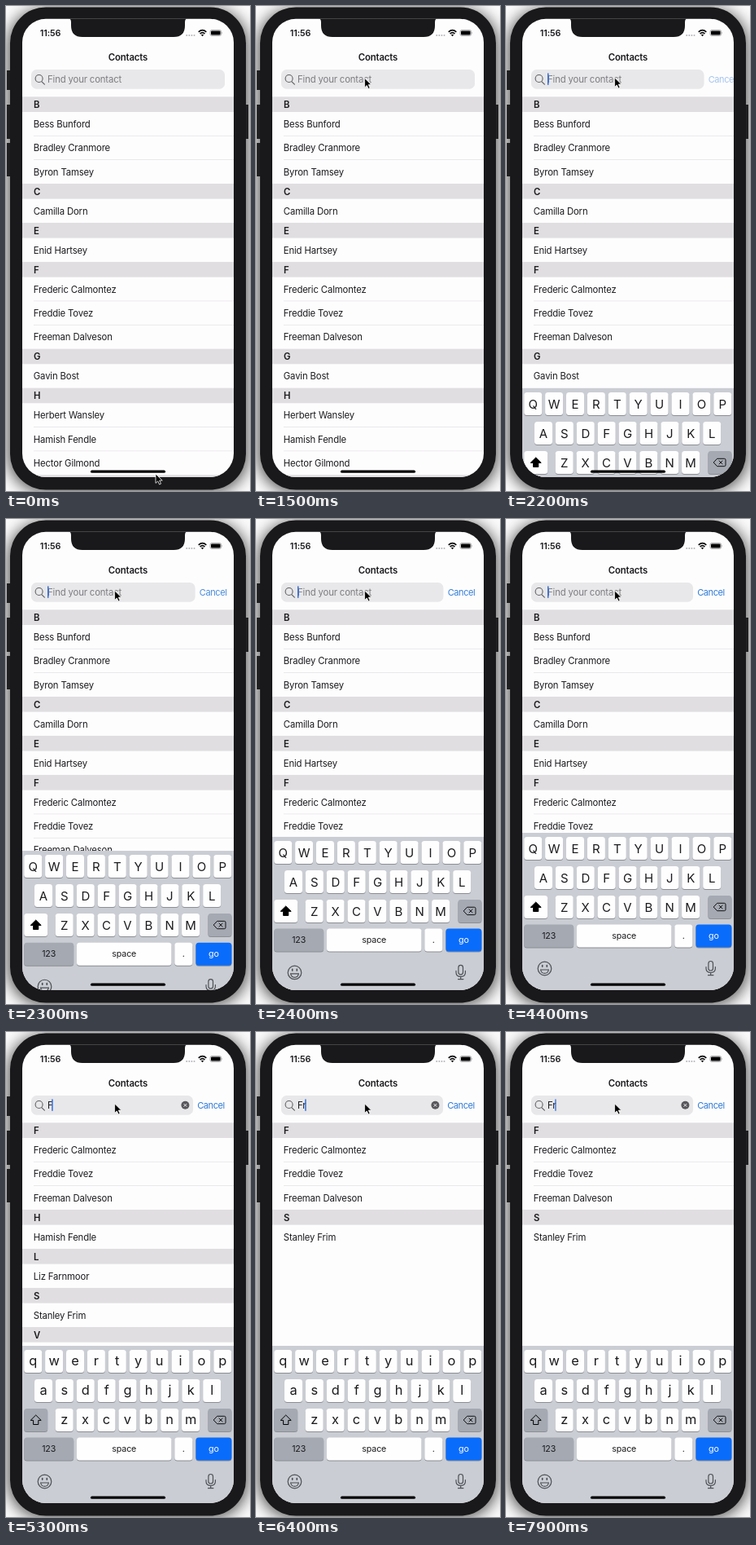
Write an HTML page that moves like this. It is 300 by 595 pixels and loops after 8 s.

```html
<!DOCTYPE html>
<html lang="en">
<head>
<meta charset="utf-8">
<title>Contact search</title>
<style>
html, body { margin: 0; width: 100%; height: 100%; overflow: hidden; background: #fafafa; }
svg { display: block; }
text { font: 400 11.33px Inter, "Liberation Sans", sans-serif; letter-spacing: -.15px; fill: #1b1a1d; }
</style>
</head>
<body>
<svg id="stage" width="300" height="595" viewBox="0 0 300 595">
  <defs>
    <clipPath id="screen"><rect x="20" y="15.7" width="260" height="562.3" rx="29"/></clipPath>
    <filter id="blur" x="-20%" y="-20%" width="140%" height="140%"><feGaussianBlur stdDeviation="9"/></filter>
  </defs>
  <rect x="2" y="3" width="296" height="594" rx="46" fill="#000" opacity=".65" filter="url(#blur)"/>
  <path d="M1 79h6v24h-6zM1 121h6v42h-6zM1 168h6v41h-6zM293 121h5v42h-5z" fill="#1f1e20"/>
  <rect x="5" y="1.5" width="290" height="592" rx="44" fill="#19181a"/>
  <g clip-path="url(#screen)">
    <rect x="20" y="15" width="260" height="563" fill="#fefdfe"/>
    <g id="list"></g>
    <g id="status">
      <path d="M76 15Q80 15 80 20V24Q80 38 94 38H206Q220 38 220 24V20Q220 15 224 15Z" fill="#19181a"/>
      <path d="M222.2 36h11" stroke="#b5b4b8" stroke-width="2" stroke-linecap="round" stroke-dasharray="0 3.1"/>
      <path d="M236.7 31.8Q241.5 27.4 246.3 31.8M238.6 34Q241.5 31.4 244.4 34" fill="none" stroke="#0c0b0d" stroke-width="1.7"/>
      <path d="M241.5 37.2l-1.6-1.8q1.6-1.2 3.2 0z"/>
      <rect x="251" y="29.5" width="13.6" height="7" rx="2" fill="none" stroke="#8a898c" stroke-width=".7"/>
      <rect x="252" y="30.5" width="11.6" height="5" rx="1.1"/>
      <path d="M265.5 31.8q1.4 1.2 0 2.4z" fill="#8a898c"/>
    </g>
    <rect id="field" x="31" y="78" width="238" height="23.7" rx="6.5" fill="#e8e7e9"/>
    <path d="M44 92.8l3.4 3.4" stroke="#626165" stroke-width="1.2" stroke-linecap="round"/>
    <circle cx="40.6" cy="89" r="4.5" fill="none" stroke="#626165" stroke-width="1.1"/>
    <g id="input"></g>
    <g id="clear">
      <circle cx="220.4" cy="89.8" r="5" fill="#58575b"/>
      <path d="M218.6 88l3.6 3.6m0-3.6l-3.6 3.6" stroke="#f4f3f5" stroke-width="1"/>
    </g>
    <rect id="caret" y="82.3" width="1.5" height="14.6" rx=".7" fill="#2f6fe0"/>
    <g id="keyboard">
      <rect x="20" y="385" width="260" height="194" fill="#cacdd3"/>
      <g id="upper"></g>
      <g id="lower"></g>
      <g id="common"></g>
      <g fill="none" stroke="#4d5055" stroke-width="1.2" stroke-linecap="round">
        <circle cx="47.5" cy="551.5" r="8.3"/>
        <path d="M42.6 553h9.8q-.9 4.4-4.9 4.4t-4.9-4.4z"/>
        <path d="M44.7 547.5v1.6m5.6-1.6v1.6" stroke-width="1.7"/>
        <rect x="248.9" y="542.5" width="5.6" height="11.5" rx="2.8"/>
        <path d="M246 549.5v1.8q0 5.2 5.7 5.2t5.7-5.2v-1.8M251.7 556.5v3.2m-3.2 0h6.4"/>
      </g>
    </g>
    <rect x="104" y="569.6" width="92" height="3.2" rx="1.6"/>
  </g>
  <path id="cursor" d="M0 0V11.4L2.7 8.9L4.6 13L6.5 12.1L4.7 8.1H8.2Z" stroke="#fff" stroke-width=".8"/>
</svg>
<script>
const $ = id => document.getElementById(id);
const contacts = {
  B: ["Bess Bunford", "Bradley Cranmore", "Byron Tamsey"],
  C: ["Camilla Dorn"],
  E: ["Enid Hartsey"],
  F: ["Frederic Calmontez", "Freddie Tovez", "Freeman Dalveson"],
  G: ["Gavin Bost"],
  H: ["Herbert Wansley", "Hamish Fendle", "Hector Gilmond"],
  L: ["Liz Farnmoor"],
  S: ["Stanley Frim"],
  V: ["Verna Foxmere"]
};

function node(parent, tag, attrs, content = "") {
  const el = document.createElementNS("http://www.w3.org/2000/svg", tag);
  for (const k in attrs) el.setAttribute(k, attrs[k]);
  el.textContent = content;
  parent.append(el);
  return el;
}
// y is the middle of the capitals
const label = (parent, x, y, str, style = "", anchor = "start") =>
  node(parent, "text", { x, y, dy: ".364em", style, "text-anchor": anchor }, str);
const rect = (parent, x, y, width, height, fill, rx = 0) =>
  node(parent, "rect", { x, y, width, height, fill, rx });

// Contact list
const ROW = 29.33, HEAD = 18.67;
function showList(query) {
  const list = $("list");
  list.replaceChildren();
  let y = 111.3;
  for (const letter in contacts) {
    const names = contacts[letter].filter(n => n.split(" ").some(w => w.startsWith(query)));
    if (!names.length) continue;
    rect(list, 20, y, 260, HEAD, "#e0dee1");
    label(list, 34, y + 9.6, letter, "font-weight:600");
    y += HEAD;
    names.forEach((name, i) => {
      if (i) rect(list, 34, y - .4, 246, .7, "#e1e0e3");
      label(list, 33.8, y + 14.8, name);
      y += ROW;
    });
  }
}

// Keyboard
const GRAY = "#a4a9b2";
function key(parent, x, y, w, fill = "#fefefe") {
  rect(parent, x, y + 1, w, 28, "#8b8e94", 3.5);
  rect(parent, x, y, w, 28, fill, 3.5);
}
function letters(parent, rows, size, dy) {
  rows.forEach((row, r) => [...row].forEach((ch, i) => {
    const x = [33.2, 46, 71.7][r] + i * 25.9, y = 390 + 36 * r;
    key(parent, x - 11, y, 22);
    label(parent, x, y + 14 + dy, ch, `font-size:${size}px;letter-spacing:0`, "middle");
  }));
}
function shift(parent, back, fill) {
  key(parent, 22.2, 462, 29, back);
  node(parent, "path", {
    d: "M36.7 470L43.2 476.4H39.8V481.5H33.6V476.4H30.2Z",
    fill, stroke: "#000", "stroke-width": 1, "stroke-linejoin": "round"
  });
}
const rows = ["QWERTYUIOP", "ASDFGHJKL", "ZXCVBNM"];
letters($("upper"), rows, 15, .3);
shift($("upper"), "#fefefe", "#000");
letters($("lower"), rows.map(r => r.toLowerCase()), 16.4, -.8);
shift($("lower"), GRAY, "none");

const common = $("common");
key(common, 248.4, 462, 29, GRAY);
node(common, "path", {
  d: "M255.2 476L259.6 471.3H268.4Q270 471.3 270 472.9V479.1Q270 480.7 268.4 480.7H259.6ZM261.8 473.7L266.4 478.3M266.4 473.7L261.8 478.3",
  fill: "none", stroke: "#111", "stroke-width": 1, "stroke-linejoin": "round"
});
for (const [x, w, str, fill, ink] of [
  [22.2, 61, "123", GRAY], [87, 116.5, "space"], [207.3, 22, "."],
  [233.4, 44, "go", "#0a6cfb", "#fff"]
]) {
  key(common, x, 497.6, w, fill);
  label(common, x + w / 2, 511, str, `font-size:10.7px;letter-spacing:-.15px;fill:${ink || "#1b1a1d"}`, "middle");
}

label($("status"), 41.8, 33.2, "11:56", "font-weight:600;font-size:10.8px");
label($("status"), 150, 62.4, "Contacts", "font-weight:600", "middle");
const entry = label($("input"), 51, 89.8, "");
const cancel = label($("input"), 0, 89.8, "Cancel", "fill:#2f7bd6;font-size:11px;letter-spacing:-.4px");

// Motion
const clamp = v => Math.min(1, Math.max(0, v));
const smooth = v => v * v * (3 - 2 * v);
const bezier = (a, b, c, u) => a * (1 - u) ** 2 + 2 * b * u * (1 - u) + c * u * u;
const spring = (ms, omega) => {
  const x = Math.max(0, ms) / 1000 * omega;
  return 1 - (1 + x) * Math.exp(-x);
};
// Caret fades: start, opacity reached, duration
const blinks = [
  [2150, 1, 1], [2720, 0, 250], [3250, 1, 250], [3720, 0, 250], [4150, 1, 250],
  [4850, 0, 250], [5290, 1, 1], [5680, 0, 300], [6190, 1, 1],
  [6850, 0, 250], [7250, 1, 250], [7870, 0, 250]
];
const caretAlpha = t => blinks.reduce((v, [at, to, d]) => v + (to - v) * clamp((t - at) / d), 0);

let shown = null;
function setQuery(query) {
  if (query === shown) return;
  shown = query;
  showList(query);
  entry.textContent = query || "Find your contact";
  entry.style.fill = query ? "#1b1a1d" : "#7d7c81";
  $("clear").style.display = $("lower").style.display = query ? "" : "none";
  $("upper").style.display = query ? "none" : "";
}

function draw(t) {
  setQuery(t < 5300 ? "" : t < 6200 ? "F" : "Fr");

  const rise = spring(t - 2096, 18.26), slide = spring(t - 2096, 21.5);
  $("keyboard").setAttribute("transform", `translate(0 ${193.5 * (1 - rise)})`);
  const right = 269 - 39 * slide;
  $("field").setAttribute("width", right - 31);
  cancel.setAttribute("x", right + 5.2);
  cancel.setAttribute("opacity", slide ** 2);

  $("caret").setAttribute("x", [51, 56.2, 60.2][shown.length]);
  $("caret").setAttribute("opacity", caretAlpha(t));

  const u = smooth(clamp((t - 250) / 750));
  const press = t >= 1500 && t < 1600 ? .5 : 0;
  const x = bezier(184, 34, 133.6, u), y = bezier(574, 250, 88, u) + press;
  $("cursor").setAttribute("transform", `translate(${x} ${y})`);
}

let start;
function frame(now) {
  start ??= now;
  draw((now - start) % 8000);
  requestAnimationFrame(frame);
}
draw(0);
requestAnimationFrame(frame);
</script>
</body>
</html>
```
